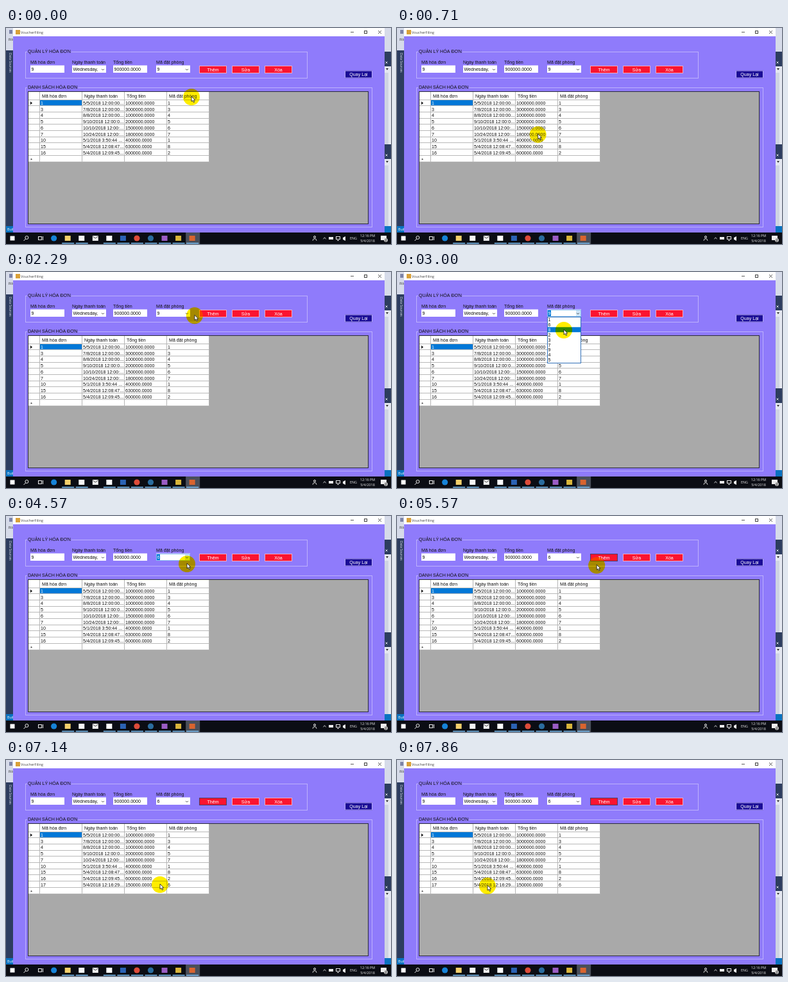
Write an HTML page with a canvas that moves like this. It is 600 by 338 pixels and loops after 8000 ms.

```html
<!DOCTYPE html>
<html lang="vi">
<head>
<meta charset="utf-8">
<style>
html, body { margin: 0; width: 600px; height: 338px; overflow: hidden; background: #8f7bfb; }
canvas { display: block; }
</style>
</head>
<body>
<canvas id="stage" width="600" height="338"></canvas>
<script>
const ctx = document.getElementById('stage').getContext('2d');
const LOOP = 8000, STEP = 1000 / 7;
const SANS = '"Liberation Sans", Arial, sans-serif';
const UI = '"Open Sans", "Noto Sans", sans-serif';
const VIOLET = '#8f7bfb', BLUE = '#0078d7', RED = '#fb1430', SLATE = '#2d3d5f', PALE = '#d6dbe9', INK = '#111';
const GRID = { x: 34, y: 99, first: 112.5, row: 9.7, col: 66 };
const LIST = { x: 234, y: 70, w: 53, row: 7.9, items: [1, 6, 8, 2, 3, 7, 9, 4, 5] };
// Steps at which the interface changes
const OPEN = 18, CHOOSE = 27, CLOSE = 30, PRESS = 37, REFRESH = 40;

// Where the hand turns or rests: step, x, y
const PATH = [
  [0, 289, 108], [3, 333, 120], [6, 180, 183], [8, 262, 70], [10, 249, 105],
  [14, 325, 78], [17, 283, 65], [21, 260, 91], [25, 247, 77], [29, 251, 74],
  [32, 282, 75], [36, 325, 66], [38, 325, 66], [43, 192, 174], [46, 176, 203],
  [50, 240, 195], [52, 268, 203], [55, 141, 197]
];

// Invoice, day, time, total, room
const before = `1 5/5 12:00:00 1000000 1
3 7/8 12:00:00 3000000 3
4 8/8 12:00:00 1000000 4
5 9/10 12:00:00 2000000 5
6 10/10 12:00:00 1500000 6
7 10/24 12:00:00 1800000 7
10 5/1 3:50:44 400000 1
15 5/4 12:08:47 630000 8
16 5/4 12:09:45 600000 2`.split('\n').map(invoice);
const after = before.filter(r => r[0] !== '6').concat([invoice('17 5/4 12:16:29 150000 6')]);

function invoice(entry) {
  const [id, day, time, total, room] = entry.split(' ');
  return [id, `${day}/2018 ${time} AM`.slice(0, 17) + '...', total + '.0000', room];
}

function rect(x, y, w, h, fill) {
  ctx.fillStyle = fill;
  ctx.fillRect(x, y, w, h);
}
function frame(x, y, w, h, color) {
  ctx.strokeStyle = color;
  ctx.lineWidth = 1;
  ctx.strokeRect(x + .5, y + .5, w - 1, h - 1);
}
function text(s, x, y, color = INK, size = 7.1, font = SANS, align = 'left') {
  ctx.font = size + 'px ' + font;
  ctx.textAlign = align;
  ctx.fillStyle = color;
  ctx.fillText(s, x, y);
}
function line(points, color, width = .8) {
  ctx.strokeStyle = color;
  ctx.lineWidth = width;
  ctx.beginPath();
  points.forEach(p => ctx.lineTo(...p));
  ctx.stroke();
}
function poly(points, fill, edge = fill) {
  ctx.beginPath();
  points.forEach(p => ctx.lineTo(...p));
  ctx.closePath();
  ctx.fillStyle = fill;
  ctx.fill();
  ctx.strokeStyle = edge;
  ctx.lineWidth = .8;
  if (edge !== fill) ctx.stroke();
}
function disc(x, y, r, fill) {
  ctx.fillStyle = fill;
  ctx.beginPath();
  ctx.arc(x, y, r, 0, 7);
  ctx.fill();
}
function ring(x, y, r, color) {
  ctx.strokeStyle = color;
  ctx.lineWidth = 1;
  ctx.beginPath();
  ctx.arc(x, y, r, 0, 7);
  ctx.stroke();
}
const chevron = (x, y, h = 1, color = '#444') => line([[x - 2, y - h], [x, y + h], [x + 2, y - h]], color);
function cross(x, y, r, color) {
  line([[x - r, y - r], [x + r, y + r]], color);
  line([[x + r, y - r], [x - r, y + r]], color);
}

function backdrop() {
  rect(0, 0, 600, 338, SLATE);
  rect(0, 0, 11, 35, PALE);
  rect(5, 3, 5, 6, '#7d84a8');
  text('File', 4, 20, '#222', 6, UI);
  ctx.save();
  ctx.translate(5, 39);
  ctx.rotate(Math.PI / 2);
  text('Data Sources', 0, 0, '#e4e8f2', 5, UI);
  ctx.restore();
  rect(590, 0, 10, 37, PALE);
  // Two docked panels with a tab above each
  [[60, 122], [205, 105]].forEach(([y, h]) => {
    cross(593, y - 6, 1.5, '#fff');
    rect(590, y, 10, h, '#e4e7f0');
    rect(590, y + 10, 6, h - 10, '#cfd4e2');
    poly([[592, y + 3], [596, y + 3], [594, y + 6]], '#333');
  });
  rect(0, 310, 600, 10, '#0a72c0');
  text('Build', 2, 317, '#fff', 5.3, UI);
}

function group(x, y, w, h, title) {
  frame(x, y, w, h, '#bdb1fc');
  ctx.font = '7.1px ' + SANS;
  rect(x + 3, y, ctx.measureText(title).width + 2, 1, VIOLET);
  text(title, x + 4, y + 2.4);
}
function button(s, x, y, fill = RED, edge = '#f4a9c0') {
  rect(x, y, 43, 12, fill);
  frame(x, y, 43, 12, edge);
  text(s, x + 21.5, y + 8.8, '#fff', 7.1, SANS, 'center');
}
function field(label, value, x, arrow) {
  text(label, x, 56.4);
  rect(x, 58.5, 53, 11.5, '#fff');
  text(value, x + 1.5, 66.5);
  if (arrow) chevron(x + 48, 65);
}

function appWindow(k) {
  rect(11, 0, 579, 320, VIOLET);
  rect(11, 0, 579, 13, '#fff');
  rect(15, 3, 7, 7, '#d9a13a');
  text('VoucherFiling', 23, 8.7, '#444', 5.6, UI);
  line([[537, 6.5], [542, 6.5]], '#333');
  frame(558, 4, 5, 5, '#444');
  cross(582.5, 6.5, 2.5, '#333');

  group(30, 37, 440, 42, 'QUẢN LÝ HÓA ĐƠN');
  group(30, 93, 541, 219, 'DANH SÁCH HÓA ĐƠN');
  field('Mã hóa đơn', '9', 38);
  field('Ngày thanh toán', 'Wednesday,', 103, true);
  field('Tổng tiền', '900000.0000', 167);
  const room = k < CHOOSE ? '9' : '6';
  field('Mã đặt phòng', room, LIST.x, true);
  if (k >= OPEN && k < PRESS) {
    frame(LIST.x, 59, LIST.w, 11, '#8cc0f0');
    rect(279, 60, 7, 9, '#cce4f7');
    chevron(282, 65);
    rect(235, 60, 5, 9, BLUE);
    text(room, 235.5, 66.5, '#fff');
  }

  ['Thêm', 'Sửa', 'Xóa'].forEach((s, i) => button(s, 301 + 51 * i, 59));
  if (k >= PRESS) button('Thêm', 301, 59, RED, '#4c3d62');
  button('Quay Lại', 528, 66.5, '#1a0c96', '#b3a8f4');
}

function grid(rows, hover) {
  const { x, y, first, row, col } = GRID;
  const colX = i => x + 18 + col * i;
  rect(x, y, 531, 208, '#a9a9a9');
  rect(x + 1, y + 1, 282, 109.5, '#fff');
  if (hover) rect(colX(3), y + 1, col, 12, '#d9e8f8');
  ['Mã hóa đơn', 'Ngày thanh toán', 'Tổng tiền', 'Mã đặt phòng']
    .forEach((s, i) => text(s, colX(i) + 4, 108.6));
  rect(colX(0) + 1, 113, col - 1, 9, BLUE);
  for (let i = 0; i <= 10; i++) rect(x + 1, Math.round(first + i * row) - 1, 282, 1, '#b8b8b8');
  for (let i = 0; i <= 4; i++) rect(colX(i), y + 1, 1, 109, '#b4b4b4');
  rows.forEach((cells, j) => cells.forEach((s, i) =>
    text(s, colX(i) + 2, first + j * row + 7.5, i + j ? INK : '#fff')));
  poly([[38, 115], [38, 120], [41, 117.5]], INK);
  text('*', 38, 208.5, INK, 8);
  frame(x, y, 531, 208, '#2a2a38');
}

function dropdown(pointerY) {
  const { x, y, w, row, items } = LIST;
  const pick = Math.max(1, Math.floor((pointerY - y) / row));
  rect(x, y, w, 73, '#fff');
  frame(x, y, w, 73, '#2f6fb8');
  rect(x + 1, y + .5 + pick * row, w - 2, row, BLUE);
  items.forEach((n, i) => text(n, x + 1.5, y + 7 + i * row, i === pick ? '#fff' : INK));
}

function taskbar() {
  const slot = i => 10 + 21.55 * i, white = '#eee';
  rect(0, 320, 600, 18, '#0b0d14');
  rect(slot(13) - 10, 320, 22, 18, '#4a4f5a');
  rect(slot(0) - 3.5, 325.5, 7, 7, '#fff');
  ring(slot(1) + .8, 328, 2.5, white);
  line([[slot(1) - 1, 330], [slot(1) - 4, 333]], white, 1);
  frame(50, 326, 6, 6, white);
  rect(57, 326, 1, 6, white);
  ['#1683d8', '#f3cf6b', '#f4f4f4', white, '#fff', '#2b62b4', '#dd4b39', '#2b6c9e', '#9a5cc4', '#d9b53a', '#d9642f']
    .forEach((color, i) => {
      const x = slot(i + 3);
      if ([0, 6, 7].includes(i)) disc(x, 329, 4.6, color);
      else rect(x - 4.5, 325, 9, 8, color);
      if (i && i !== 3) rect(x - 9, 336, 19, 1.5, '#76b9ed');
    });
  line([[slot(6) - 4, 326], [slot(6), 329], [slot(6) + 4, 326]], '#222');

  ring(481, 327, 1.5, white);
  line([[478, 333], [479, 330], [483, 330], [484, 333]], white);
  chevron(496.5, 329, -1.3, white);
  rect(503, 327, 7, 4, white);
  frame(514, 326, 7, 5, white);
  rect(516, 332, 3, 1, white);
  poly([[525, 328], [529, 326], [529, 333], [525, 331]], white);
  [['ENG', 541.5, 331.2], ['12:16 PM', 563.5, 327.3], ['5/4/2018', 563.5, 335.3]]
    .forEach(([s, x, y]) => text(s, x, y, white, 5.4, UI, 'center'));
  rect(584, 325, 9, 7, white);
  disc(592, 332, 3, '#bbb');
  text('2', 592, 334, INK, 5, UI, 'center');
}

function pointer(x, y, resize) {
  ctx.save();
  ctx.translate(x, y);
  disc(0, 0, 13, 'rgba(255,238,0,.2)');
  ctx.globalCompositeOperation = 'multiply';
  disc(0, 0, 13, '#fff000');
  ctx.globalCompositeOperation = 'source-over';
  if (resize) {
    rect(-3, -1.5, 6, 3, '#222');
    [-1, 1].forEach(s => poly([[5 * s, 0], [2 * s, -3], [2 * s, 3]], '#fff', '#222'));
    rect(-3, -.6, 6, 1.2, '#fff');
  } else {
    poly([[0, -1], [0, 7], [1.9, 5.4], [3.3, 8.4], [4.7, 7.8], [3.4, 4.9], [5.8, 4.8]], '#fff', INK);
  }
  ctx.restore();
}

function position(k) {
  const i = Math.max(1, PATH.findIndex(p => p[0] >= k));
  const [a, x0, y0] = PATH[i - 1], [b, x1, y1] = PATH[i];
  const f = (k - a) / (b - a), ease = f * f * (3 - 2 * f);
  return [x0 + (x1 - x0) * ease, y0 + (y1 - y0) * ease];
}

function draw(now) {
  const k = Math.min(55, Math.floor((now % LOOP + 5) / STEP));
  const [x, y] = position(k);
  const onEdge = k === 10;
  backdrop();
  appWindow(k);
  grid(k < REFRESH ? before : after, onEdge);
  if (k >= OPEN && k < CLOSE) dropdown(y);
  taskbar();
  pointer(x, y, onEdge);
  requestAnimationFrame(draw);
}
requestAnimationFrame(draw);
</script>
</body>
</html>
```
